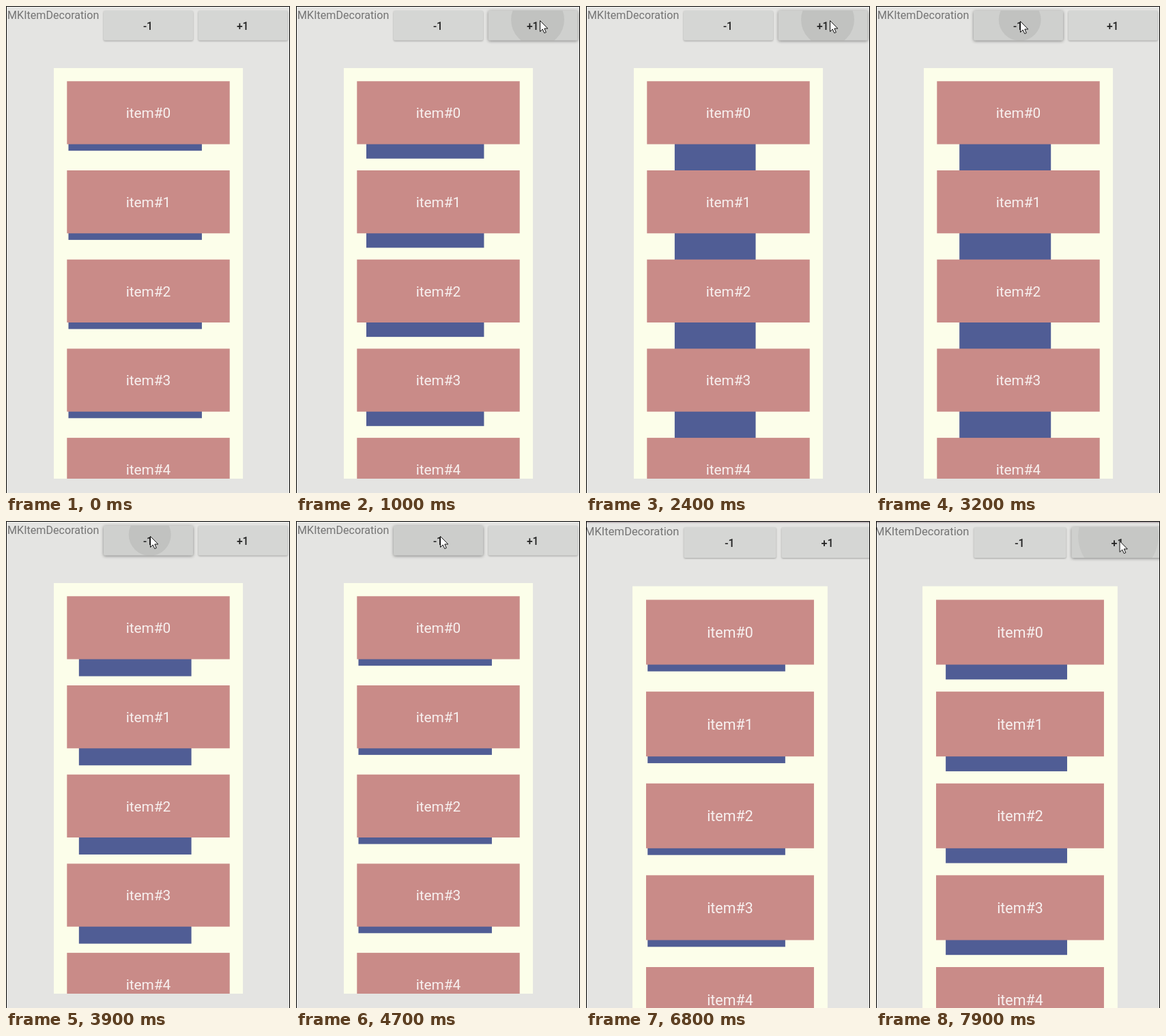
Write an HTML page that moves like this. It is 416 px wide and 714 px high and loops after 8 s.

```html
<!DOCTYPE html>
<html lang="en">
<head>
<meta charset="utf-8">
<title>Item decoration</title>
<style>
  html, body { margin: 0; width: 100%; height: 100%; overflow: hidden; background: #e4e4e2; }
  svg { display: block; width: 416px; height: 714px; font-family: Roboto, "Noto Sans", sans-serif; }
  .button { filter: drop-shadow(0 1px 1px rgba(0, 0, 0, .28)); }
  .button.pressed { filter: drop-shadow(0 1px 2px rgba(0, 0, 0, .42)); }
</style>
</head>
<body>
<svg id="stage" viewBox="0 0 416 714">
  <defs>
    <clipPath id="panelClip"><rect x="70" y="91" width="277" height="602"/></clipPath>
  </defs>
  <rect width="416" height="714" fill="#e4e4e2"/>
  <rect id="statusLine" x="1" y="1" width="414" height="2" fill="#b5adb0"/>
  <g id="screen">
    <text x="2" y="18.7" font-size="16.1" fill="#747474">MKItemDecoration</text>
    <g id="buttons"></g>
    <rect x="70" y="91" width="277" height="602" fill="#fcfeea"/>
    <g clip-path="url(#panelClip)">
      <g id="bars" fill="#505d95"></g>
      <g id="items"></g>
    </g>
  </g>
  <path d="M.5 714V.5H415.5V714" fill="none" stroke="#000"/>
  <path id="cursor" d="M.5 .5V16.5L4.2 13 6.8 18.6 9.3 17.5 6.8 12H11.8Z"
        fill="#fff" stroke="#111" stroke-width="1"/>
</svg>
<script>
const LOOP = 8000, STEP = 100, ZOOM_AT = 6800;
const ROWS = 5, PITCH = 130.7, ITEM_TOP = 110.3, ITEM_HEIGHT = 92.3, UNIT = 3.84;

const $ = id => document.getElementById(id);

function add(parent, tag, attrs, text = '') {
  const node = document.createElementNS('http://www.w3.org/2000/svg', tag);
  set(node, attrs);
  node.textContent = text;
  parent.appendChild(node);
  return node;
}

function set(node, attrs) {
  for (const name in attrs) node.setAttribute(name, attrs[name]);
}

function makeButton(id, x, label) {
  const box = { x, y: 6.8, width: 131, height: 43.8, rx: 2 };
  const clip = add(document.querySelector('defs'), 'clipPath', { id });
  add(clip, 'rect', box);
  const group = add($('buttons'), 'g', { class: 'button' });
  const face = add(group, 'rect', { ...box, fill: '#d5d6d4' });
  const ripple = add(group, 'circle', { cy: 20, fill: '#000', 'clip-path': `url(#${id})` });
  add(group, 'text', {
    x: x + 65, y: 35, 'font-size': 15.6, 'font-weight': 500, fill: '#222', 'text-anchor': 'middle'
  }, label);
  return { group, face, ripple };
}

const minus = makeButton('minusClip', 143, '-1');
const plus = makeButton('plusClip', 281.7, '+1');

const bars = [];
for (let i = 0; i < ROWS; i++) {
  const y = ITEM_TOP + i * PITCH;
  bars.push(add($('bars'), 'rect', { y: y + ITEM_HEIGHT - 1 }));
  add($('items'), 'rect', { x: 89.3, y, width: 238.4, height: ITEM_HEIGHT, fill: '#c98b88' });
  add($('items'), 'text', {
    x: 208.5, y: y + 54, 'font-size': 20.8, fill: '#f8f1f0', 'text-anchor': 'middle'
  }, 'item#' + i);
}

// Click times for each pass over a button.
const passes = [
  { button: plus, delta: 1, x: 354, radius: 39,
    clicks: [600, 800, 1000, 1100, 1300, 1500, 1700, 1900, 2200, 2400] },
  { button: minus, delta: -1, x: 210.7, radius: 31,
    clicks: [3000, 3200, 3400, 3500, 3700, 3900, 4100, 4300] },
  { button: minus, delta: -1, x: 210.7, radius: 90, clicks: [4500, 4700, 4900, 5100, 5600] },
  { button: plus, delta: 1, x: 348, radius: 51, clicks: [7400, 7600, 7800] }
];

const pointerPaths = [
  [[200, 383, 26], [400, 357, 21], [2500, 357, 21], [2900, 211, 22], [5600, 211, 22], [5900, 399, 45]],
  [[7000, 403, 687], [7300, 356.5, 29], [7900, 356.5, 29]]
];

function pointerAt(t) {
  const path = pointerPaths.find(p => t >= p[0][0] && t <= p[p.length - 1][0]);
  if (!path) return null;
  const next = Math.max(1, path.findIndex(key => key[0] >= t));
  const [t0, x0, y0] = path[next - 1], [t1, x1, y1] = path[next];
  const u = (t - t0) / (t1 - t0);
  return [x0 + (x1 - x0) * u, y0 + (y1 - y0) * u];
}

function countAt(t) {
  const zoomed = t >= ZOOM_AT;
  let count = 2;
  for (const { clicks, delta } of passes)
    for (const time of clicks)
      if (time <= t && (time >= ZOOM_AT) === zoomed) count += delta;
  return count;
}

function drawButton(button, t) {
  let latest = null;
  for (const pass of passes)
    if (pass.button === button)
      for (const time of pass.clicks)
        if (time <= t) latest = { ...pass, age: t - time };
  const active = latest && latest.age < 300;
  button.group.classList.toggle('pressed', Boolean(active));
  button.face.setAttribute('fill', active ? '#cfd0ce' : '#d5d6d4');
  set(button.ripple, active
    ? { cx: latest.x, r: latest.radius + latest.age * .06,
        opacity: (latest.radius > 80 ? .015 : .065) * (1 - latest.age / 300) }
    : { r: 0 });
}

function render(t) {
  const zoomed = t >= ZOOM_AT;
  $('screen').setAttribute('transform', zoomed ? 'translate(-4.1 1.9) scale(1.0315 1.03)' : '');
  $('statusLine').setAttribute('opacity', zoomed ? 1 : 0);

  const count = countAt(t);
  const inset = UNIT * count;
  for (const bar of bars)
    set(bar, {
      x: 83.8 + inset,
      width: 210.8 - 2 * inset,
      height: count < 0 ? 0 : UNIT * (count + .5) + 1
    });

  drawButton(minus, t);
  drawButton(plus, t);

  const pointer = pointerAt(t);
  set($('cursor'), pointer
    ? { transform: `translate(${pointer})`, visibility: 'visible' }
    : { visibility: 'hidden' });
}

function tick() {
  render(Math.floor(performance.now() % LOOP / STEP) * STEP);
  requestAnimationFrame(tick);
}
tick();
</script>
</body>
</html>
```
